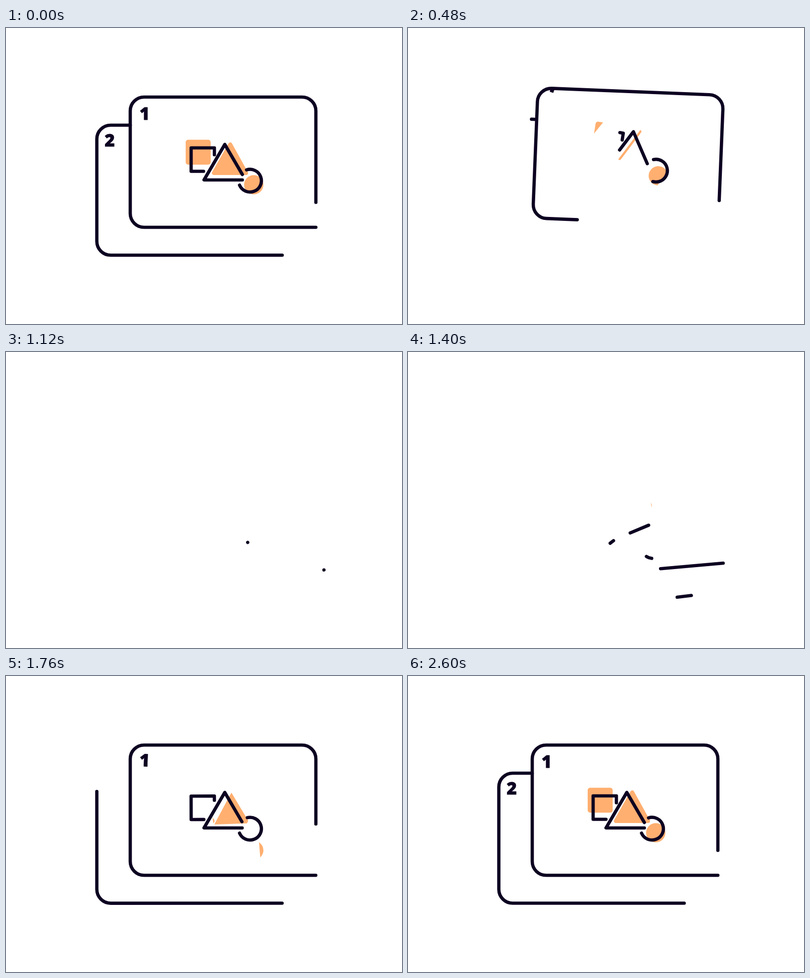
Animation of 800x600 px, one loop 2720 ms. Source, as an HTML page with a canvas:

```html
<!DOCTYPE html>
<html lang="en">
<head>
<meta charset="utf-8">
<title>Slides</title>
<style>
  html, body { margin: 0; width: 100%; height: 100%; overflow: hidden; background: #fff; }
  canvas { display: block; }
</style>
</head>
<body>
<canvas id="stage" width="800" height="600"></canvas>
<script>
const ctx = document.getElementById('stage').getContext('2d');
const LOOP = 2720, STEP = 40, TURN = 1040; // TURN: everything has left, entrance begins
const INK = '#0d0221', ORANGE = '#ffaf70', RAD = Math.PI / 180;

// Symmetric cubic-bezier(.8, 0, .2, 1)
function ease(x) {
  if (x <= 0) return 0;
  if (x >= 1) return 1;
  let lo = 0, hi = 1, s;
  for (let i = 0; i < 24; i++) {
    s = (lo + hi) / 2;
    const q = 1 - s;
    if (2.4 * q * q * s + .6 * q * s * s + s ** 3 < x) lo = s; else hi = s;
  }
  return s * s * (3 - 2 * s);
}
const span = (t, [a, b]) => ease((t - a) / (b - a));

// Travel of each kind of part: [dx, dy, degrees]
const SHAPE_OUT = [62, -200, 52], SHAPE_IN = [2, 110, -42];
const FILL_OUT = [74, -200, 52], FILL_IN = [0, 43, -42];
const CARD_IN = [0, 65, -8];

// c: pivot; out/in: timing of the travel; hide/show: timing of the trim or wipe
const card1 = {
  d: 'M626 353.5V168A28 28 0 0 0 598 140H279A28 28 0 0 0 251 168V376A28 28 0 0 0 279 404H626',
  c: [439, 272], from: [53, -98, 20], to: CARD_IN,
  out: [120, 1160], in: [1110, 1725], hide: [120, 960], show: [1110, 1970]
};
const card2 = {
  d: 'M251 197H211.5A28 28 0 0 0 183.5 225V432.5A28 28 0 0 0 211.5 460.5H558',
  c: [371, 329], from: [0, -35, 20], to: CARD_IN,
  out: [45, 1190], in: [1184, 1787], hide: [0, 560], show: [1184, 2091]
};
const lines = [
  card2, card1,
  {
    d: 'M421 257V243H374V290.5H400', c: [397, 267], from: SHAPE_OUT, to: SHAPE_IN,
    out: [0, 1230], in: [1193, 1810], hide: [-70, 818], show: [1193, 1933]
  },
  {
    d: 'M477.5 297L442 236L400 308H477.5', c: [440, 280], from: SHAPE_OUT, to: SHAPE_IN,
    out: [77, 1192], in: [1110, 1700], hide: [57, 905], show: [1110, 1846]
  },
  {
    d: 'M485.9 287.6A23 23 0 1 1 471.8 318.5', c: [493, 309.5], from: [78, -198, 52], to: SHAPE_IN,
    out: [152, 1137], in: [1154, 1741], hide: [148, 945], show: [1154, 1874]
  }
];
for (const p of lines) {
  const el = document.createElementNS('http://www.w3.org/2000/svg', 'path');
  el.setAttribute('d', p.d);
  p.length = el.getTotalLength() - .4; // keeps the first short dash on the path
  p.path = new Path2D(p.d);
}

const square = new Path2D(), triangle = new Path2D('M453 236L420 294H485Z'), disc = new Path2D();
square.roundRect(363, 226.5, 50.5, 50.5, 5);
disc.arc(500.5, 317.8, 19.5, 0, 7);

// reach: extent of the shape along the wipe direction, measured from its pivot
const fills = [
  {
    path: square, c: [388, 252], reach: [-33, 33], from: FILL_OUT, to: FILL_IN,
    out: [0, 1230], in: [1570, 2150], hide: [-50, 820], show: [1592, 2232]
  },
  {
    path: triangle, c: [453, 275], reach: [-20, 40], edge: 8, from: FILL_OUT, to: FILL_IN,
    out: [77, 1192], in: [1306, 1906], hide: [85, 645], show: [1300, 1920]
  },
  {
    path: disc, c: [500.5, 317.8], reach: [-19.5, 19.5], from: [50, -177, 52], to: FILL_IN,
    out: [152, 1137], in: [1500, 2160], hide: [225, 820], show: [1500, 2140]
  }
];

const digits = [
  {
    text: '2', c: [209.5, 227.5], base: 240, card: card2, top: 197,
    from: [0, -60, 26], to: [0, -60, 50], out: [0, 640], in: [1440, 2290]
  },
  {
    text: '1', c: [280, 173.5], base: 186, card: card1, top: 140,
    from: [0, -60, 26], to: [0, -60, 50], out: [150, 770], in: [1277, 1917]
  }
];

const leaving = t => t < TURN;
const visible = (p, t) => leaving(t) ? 1 - span(t, p.hide) : span(t, p.show);

function pose(p, t) {
  const k = leaving(t) ? span(t, p.out) : 1 - span(t, p.in);
  const [dx, dy, turn] = leaving(t) ? p.from : p.to;
  const [x, y] = p.c;
  ctx.translate(x + dx * k, y + dy * k);
  ctx.rotate(turn * k * RAD);
  ctx.translate(-x, -y);
}

function clipBox(x, y, w, h) {
  ctx.beginPath();
  ctx.rect(x, y, w, h);
  ctx.clip();
}

function drawLine(p, t) {
  const v = visible(p, t), L = p.length;
  if (v <= 0) return;
  pose(p, t);
  if (v < 1) {
    ctx.setLineDash([v * L, 2 * L]);
    ctx.lineDashOffset = leaving(t) ? 0 : (v - 1) * L;
  }
  ctx.lineWidth = 6.6;
  ctx.stroke(p.path);
}

function drawFill(p, t) {
  const v = visible(p, t);
  if (v <= 0) return;
  pose(p, t);
  if (v < 1) {
    const [lo, hi] = p.reach, w = (hi - lo) * v;
    ctx.translate(...p.c);
    ctx.rotate(30 * RAD);
    clipBox(leaving(t) ? lo : hi - w, -60, w, 120);
    ctx.rotate(-30 * RAD);
    ctx.translate(-p.c[0], -p.c[1]);
  }
  ctx.fillStyle = ctx.strokeStyle = ORANGE;
  ctx.fill(p.path);
  if (p.edge) {
    ctx.lineWidth = p.edge;
    ctx.stroke(p.path);
  }
}

// Digits slide behind the top edge of their card
function drawDigit(p, t) {
  pose(p.card, t);
  clipBox(0, p.top, 800, 300);
  pose(p, t);
  ctx.lineWidth = .8;
  ctx.fillText(p.text, p.c[0], p.base);
  ctx.strokeText(p.text, p.c[0], p.base);
}

function each(parts, draw, t) {
  for (const p of parts) {
    ctx.save();
    draw(p, t);
    ctx.restore();
  }
}

ctx.lineCap = ctx.lineJoin = 'round';
ctx.font = '800 35px "Open Sans", "Noto Sans", sans-serif';
ctx.textAlign = 'center';
ctx.fillStyle = ctx.strokeStyle = INK;

const start = performance.now();
function frame() {
  const now = Math.max(0, performance.now() - start) % LOOP;
  const t = Math.floor(now / STEP) * STEP;
  ctx.clearRect(0, 0, 800, 600);
  each(fills, drawFill, t);
  each(digits, drawDigit, t);
  each(lines, drawLine, t);
  requestAnimationFrame(frame);
}
frame();
</script>
</body>
</html>
```
